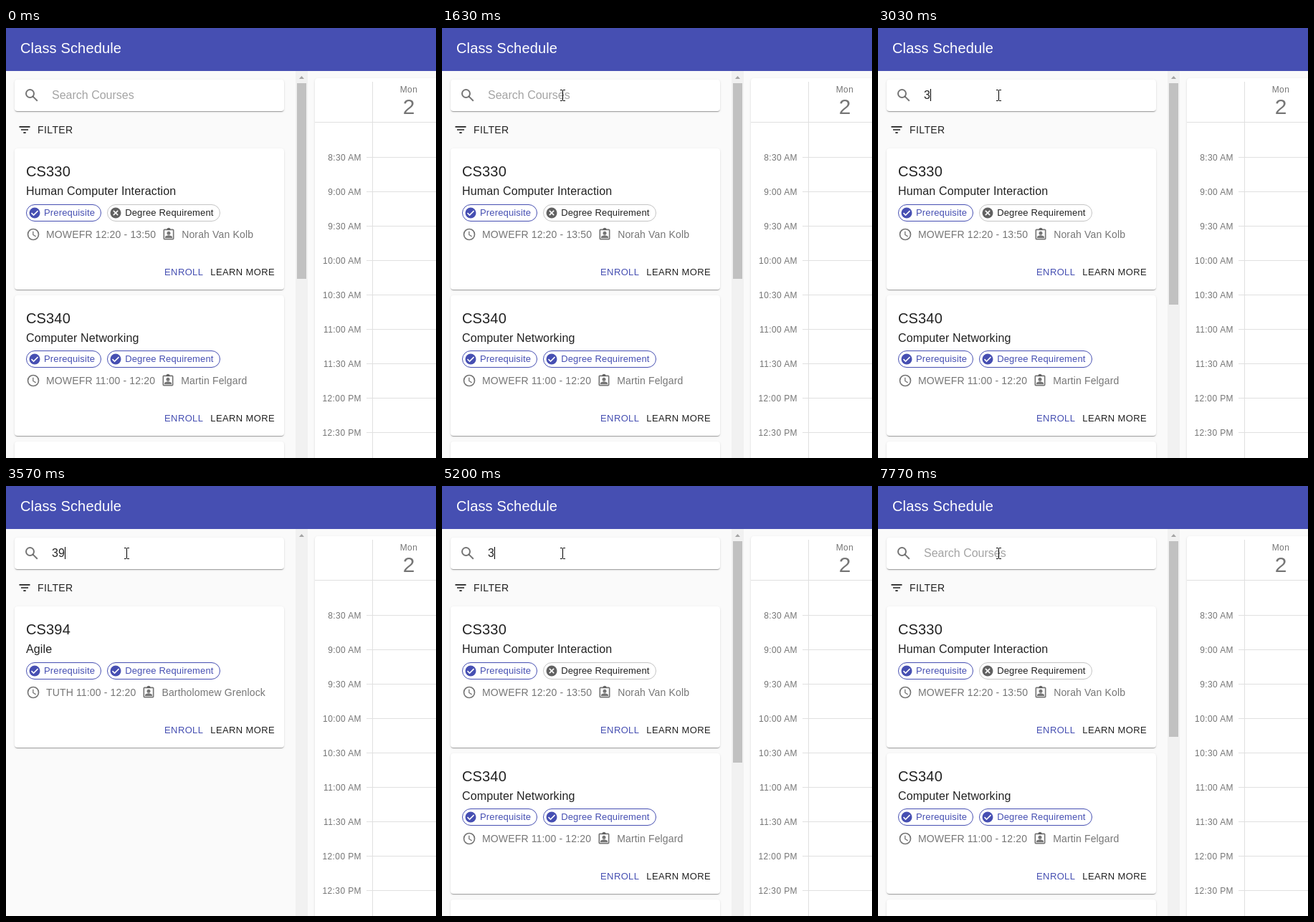
An HTML page for the animation above (8000 ms loop, 600 px wide and 600 px high).

```html
<!DOCTYPE html>
<html lang="en">
<head>
<meta charset="utf-8">
<title>Class Schedule</title>
<style>
  :root { --main: #464fb2; --text: rgba(0,0,0,.87); --soft: rgba(0,0,0,.54); --line: #e0e0e0; }
  * { box-sizing: border-box; }
  html, body { margin: 0; width: 100%; height: 100%; overflow: hidden; }
  body {
    position: relative; background: #fafafa; color: var(--text);
    font: 16px/24px "Liberation Sans", Arial, sans-serif;
  }
  svg { display: block; fill: currentColor; flex: none; }
  .abs, .card, .low, .search, .search > *, .time, .rule, .cursor { position: absolute; }

  header {
    height: 60px; padding: 12px 20px; background: var(--main); color: #fff;
    font-size: 20px; line-height: 32px; letter-spacing: .15px;
  }
  .paper {
    background: #fff; border-radius: 4px;
    box-shadow: 0 2px 1px -1px rgba(0,0,0,.2), 0 1px 1px rgba(0,0,0,.14), 0 1px 3px rgba(0,0,0,.12);
  }

  .search { left: 12px; top: 72px; width: 376px; height: 44px; }
  .search > * { left: 52px; top: 10px; white-space: pre; }
  .search .icon { left: 12px; top: 10px; color: var(--soft); }
  .hint { color: rgba(0,0,0,.36); }
  .search .caret { top: 13px; width: 1px; height: 17px; background: #000; }
  .filter {
    left: 16px; top: 130px; display: flex; align-items: center; gap: 8px;
    font-size: 14px; letter-spacing: .4px;
  }

  .card { left: 12px; width: 376px; padding: 16px; }
  .code { font-size: 20px; line-height: 32px; letter-spacing: .15px; }
  .name { letter-spacing: .15px; }
  .low { left: 16px; right: 13px; bottom: 0; height: 119px; }
  .chips, .info, .actions { display: flex; align-items: center; white-space: nowrap; }
  .chips { gap: 8px; font-size: 13px; letter-spacing: .15px; }
  .chip {
    display: flex; align-items: center; gap: 4px; height: 24px; padding: 0 8px 0 2px;
    border: 1px solid var(--main); border-radius: 12px; color: var(--main);
  }
  .chip.no { border-color: rgba(0,0,0,.23); color: var(--text); }
  .chip.no svg { color: #616161; }
  .info { margin-top: 6px; gap: 8px; font-size: 14px; letter-spacing: .15px; color: var(--soft); }
  .actions { margin-top: 29px; justify-content: flex-end; gap: 10px; font-size: 13px; letter-spacing: .37px; }
  .actions b { font-weight: 400; color: var(--main); }

  .track { left: 404px; top: 60px; width: 17px; height: 540px; background: #f1f1f1; }
  .track svg { margin: 7px 0 0 5px; color: #a3a3a3; }
  .thumb { left: 2px; top: 17px; width: 13px; height: 273px; background: #c1c1c1; }

  .plan { left: 431px; top: 70px; width: 190px; height: 560px; }
  .rule { background: var(--line); height: 1px; }
  .day { left: 81px; width: 100px; text-align: center; color: var(--soft); }
  .time {
    left: 0; width: 65px; text-align: right; white-space: nowrap;
    font-size: 12px; letter-spacing: .4px; color: var(--soft);
  }
  .cursor { left: 0; top: 0; overflow: visible; }

  /* 1% = 80 ms */
  .caret, .hint, .d1, .d2, .d3, .thumb, .list, .found, .cursor, .arrow, .beam { animation: 8s step-end infinite; }
  .hint  { animation-name: hint; }
  .d1    { animation-name: first; }
  .d2    { animation-name: second; }
  .d3    { animation-name: third; }
  .caret { animation-name: caret; }
  .thumb { animation-name: thumb; }
  .list  { animation-name: list; }
  .found { animation-name: second; }
  .cursor { animation-name: move; }
  .arrow { animation-name: arrow; }
  .beam  { animation-name: beam; }

  @keyframes hint   { 0%, 69.875% { opacity: 1 } 37.875% { opacity: 0 } }
  @keyframes first  { 0%, 69.875% { opacity: 0 } 37.875% { opacity: 1 } }
  @keyframes second { 0%, 65% { opacity: 0 } 44.625% { opacity: 1 } }
  @keyframes third  { 0%, 59.125% { opacity: 0 } 50.5% { opacity: 1 } }
  @keyframes list   { 0%, 65% { opacity: 1 } 44.625% { opacity: 0 } }
  @keyframes thumb {
    0%, 69.875% { height: 273px }
    37.875%, 65% { height: 309px }
    44.625% { height: 0 }
  }
  @keyframes caret {
    0%, 20.375%, 34%, 69.875%, 83.5%, 97.125% { opacity: 0; transform: none }
    13.75%, 27.125%, 77.75%, 90.375% { opacity: 1; transform: none }
    37.875%, 65% { opacity: 1; transform: translateX(9px) }
    44.625%, 64% { opacity: 1; transform: translateX(18px) }
    50.5% { opacity: 1; transform: translateX(27px) }
    57.25%, 59.125% { opacity: 0; transform: translateX(27px) }
  }
  @keyframes move {
    0%, 2.75% { transform: translate(575px, 590px) }
    3.75% { transform: translate(548px, 545px) }
    4.75% { transform: translate(490px, 460px) }
    5.75% { transform: translate(414px, 358px) }
    6.75% { transform: translate(338px, 262px) }
    7.75% { transform: translate(272px, 188px) }
    8.75% { transform: translate(218px, 132px) }
    9.75% { transform: translate(182px, 102px) }
    10.75%, 100% { transform: translate(168px, 94px) }
  }
  @keyframes arrow { 0%, 9.75% { opacity: 0 } 2.75% { opacity: 1 } }
  @keyframes beam  { 0% { opacity: 0 } 9.75%, 100% { opacity: 1 } }
</style>
</head>
<body>
<svg width="0" height="0" class="abs">
  <symbol id="search" viewBox="0 0 24 24">
    <g fill="none" stroke="currentColor" stroke-width="2"><circle cx="9.5" cy="9.5" r="5.5"/><path d="M13.6 13.6l6.2 6.2"/></g>
  </symbol>
  <symbol id="filter" viewBox="0 0 24 24"><path d="M3 6h18v2H3zM6 11h12v2H6zM10 16h4v2h-4z"/></symbol>
  <symbol id="clock" viewBox="0 0 24 24">
    <g fill="none" stroke="currentColor"><circle cx="12" cy="12" r="9" stroke-width="2"/><path d="M11.75 7v5.6l4.6 2.8" stroke-width="1.6"/></g>
  </symbol>
  <symbol id="badge" viewBox="0 0 24 24">
    <rect x="4" y="4" width="16" height="16" rx="1" fill="none" stroke="currentColor" stroke-width="2"/>
    <path d="M9 4a3 3 0 0 1 6 0z"/>
    <circle cx="12" cy="10" r="3"/><path d="M6 18v-1.4c0-2 4-3.1 6-3.1s6 1.1 6 3.1V18z"/>
  </symbol>
  <symbol id="yes" viewBox="0 0 24 24">
    <circle cx="12" cy="12" r="10"/><path d="M6 12.2l4 4 8-8" fill="none" stroke="#fff" stroke-width="2"/>
  </symbol>
  <symbol id="no" viewBox="0 0 24 24">
    <circle cx="12" cy="12" r="10"/><path d="M7.8 7.8l8.4 8.4m0-8.4l-8.4 8.4" stroke="#fff" stroke-width="2"/>
  </symbol>
</svg>

<header>Class Schedule</header>

<div class="search paper">
  <svg class="icon" width="24" height="24"><use href="#search"/></svg>
  <span class="hint">Search Courses</span>
  <span><span class="d1">3</span><span class="d2">9</span><span class="d3">4</span></span>
  <i class="caret"></i>
</div>
<div class="filter abs"><svg width="20" height="20"><use href="#filter"/></svg>FILTER</div>

<div class="list"></div>
<div class="found"></div>

<div class="track abs">
  <svg width="7" height="4"><path d="M0 4L3.5 0 7 4z"/></svg>
  <div class="thumb abs"></div>
</div>

<div class="plan paper abs">
  <div class="rule" style="left:0;top:61px;width:190px"></div>
  <div class="rule" style="left:80px;top:5px;width:1px;height:555px"></div>
  <div class="day abs" style="top:4px;font-size:12px;letter-spacing:.4px">Mon</div>
  <div class="day abs" style="top:28px;font-size:30px">2</div>
</div>

<svg class="cursor" width="1" height="1">
  <path class="arrow" d="M.5 .5v16l3.7-3.5 2.4 5.6 2.4-1-2.4-5.5h5z" fill="#fff" stroke="#000"/>
  <path class="beam" d="M-3 -7.5h3m1 0h3M.5 -7V7M-3 7.5h3m1 0h3" fill="none" stroke="#000"/>
</svg>

<script>
  const find = s => document.querySelector(s);
  const icon = (id, size) => `<svg width="${size}" height="${size}"><use href="#${id}"/></svg>`;
  const chip = (label, ok) => {
    const kind = ok ? 'yes' : 'no';
    return `<span class="chip ${kind}">${icon(kind, 18)}${label}</span>`;
  };
  const card = (top, height, code, name, degree, hours, teacher) => `
    <div class="card paper" style="top:${top}px;height:${height}px">
      <div class="code">${code}</div>
      <div class="name">${name}</div>
      <div class="low">
        <div class="chips">${chip('Prerequisite', true)}${chip('Degree Requirement', degree)}</div>
        <div class="info">${icon('clock', 20)}<span>${hours}</span>${icon('badge', 20)}<span>${teacher}</span></div>
        <div class="actions"><b>ENROLL</b><span>LEARN MORE</span></div>
      </div>
    </div>`;

  find('.list').innerHTML =
    card(168, 197, 'CS330', 'Human Computer Interaction', false, 'MOWEFR 12:20 - 13:50', 'Norah Van Kolb') +
    card(373, 196, 'CS340', 'Computer Networking', true, 'MOWEFR 11:00 - 12:20', 'Martin Felgard') +
    '<div class="card paper" style="top:577px;height:197px"></div>';
  find('.found').innerHTML =
    card(168, 197, 'CS394', 'Agile', true, 'TUTH 11:00 - 12:20', 'Bartholomew Grenlock');

  let rows = '';
  for (let i = 0; i < 9; i++) {
    const half = 17 + i, hour = half >> 1, y = 110 + i * 48;
    const label = `${hour}:${half % 2 ? '30' : '00'} ${hour < 12 ? 'AM' : 'PM'}`;
    rows += `<div class="time" style="top:${y - 11}px">${label}</div>
      <div class="rule" style="left:72px;top:${y}px;width:118px"></div>`;
  }
  find('.plan').insertAdjacentHTML('beforeend', rows);
</script>
</body>
</html>
```
